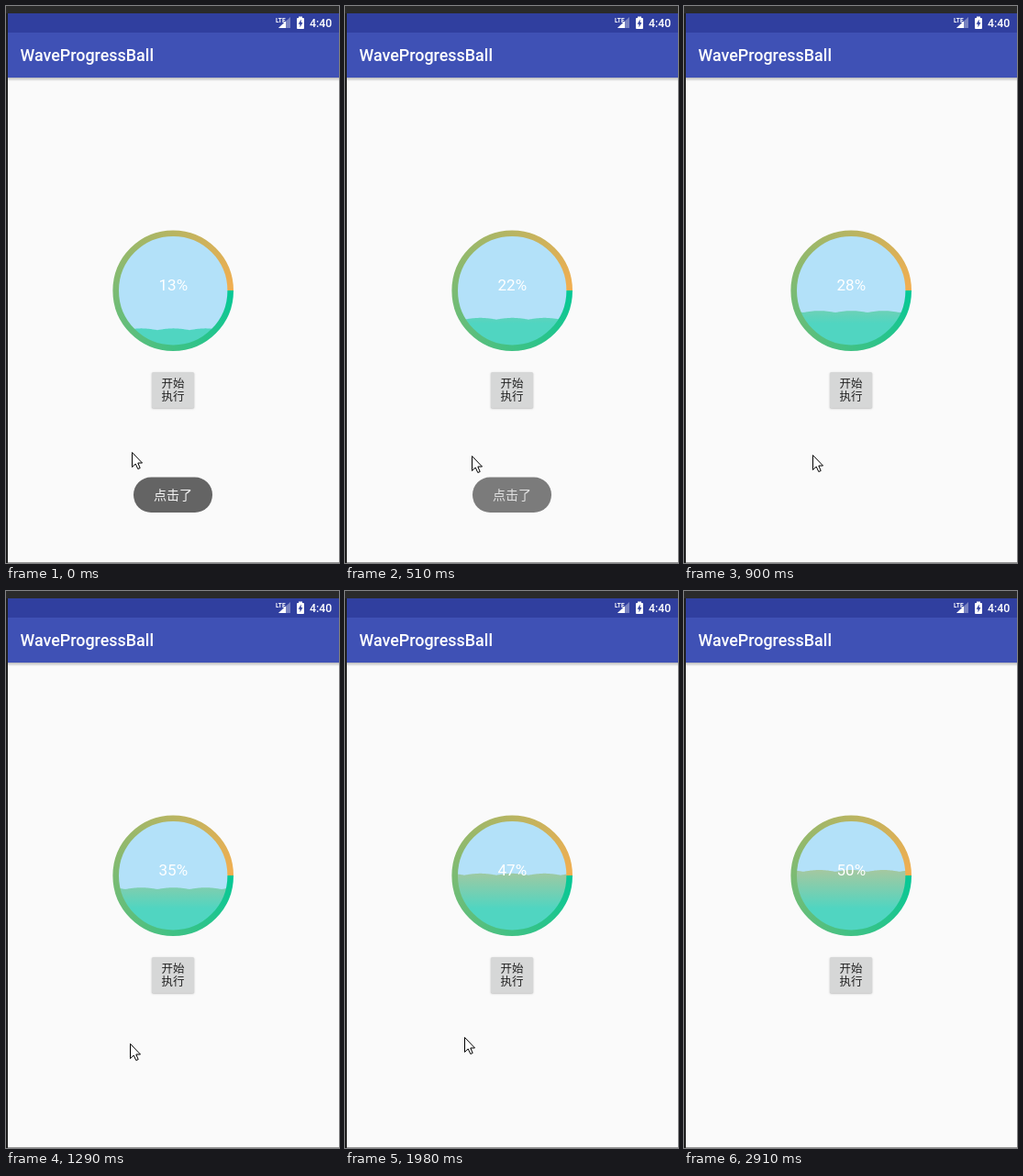
An HTML page with a canvas that plays this animation: 363 px wide and 607 px high, repeating every 3190 ms.

```html
<!DOCTYPE html>
<html lang="zh">
<head>
<meta charset="utf-8">
<title>WaveProgressBall</title>
<style>
html, body { margin: 0; width: 363px; height: 607px; overflow: hidden; background: #fafafa; }
canvas { display: block; }
</style>
</head>
<body>
<canvas id="stage" width="363" height="607"></canvas>
<script>
const ctx = document.getElementById('stage').getContext('2d');
const LOOP = 3190;
const CX = 182.2, CY = 310.2;
const CJK = '"Noto Sans CJK SC", "Noto Sans CJK", sans-serif';
// Resting places of the pointer tip
const STOPS = [
  { t: 0, x: 137, y: 486 },
  { t: 240, x: 137, y: 491 },
  { t: 630, x: 140, y: 489 },
  { t: 1290, x: 135, y: 493 },
  { t: 1680, x: 129, y: 490 },
  { t: 2250, x: 134, y: 460 },
  { t: 2490, x: 144, y: 436 },
  { t: 2790, x: 307, y: 600 },
];

const clamp = v => Math.min(1, Math.max(0, v));
const mix = (a, b, u) => a + (b - a) * u;
const easeIn = u => u ** 3;
const easeOut = u => 1 - (1 - u) ** 2;

function rect(color, x, y, w, h, r = 0) {
  ctx.fillStyle = color;
  ctx.beginPath();
  ctx.roundRect(x, y, w, h, r);
  ctx.fill();
}

function polygon(color, points) {
  ctx.fillStyle = color;
  ctx.beginPath();
  points.forEach(([x, y]) => ctx.lineTo(x, y));
  ctx.closePath();
  ctx.fill();
}

function disc(radius) {
  ctx.beginPath();
  ctx.arc(CX, CY, radius, 0, Math.PI * 2);
}

function blend(gradient, from, to) {
  gradient.addColorStop(0, from);
  gradient.addColorStop(1, to);
  return gradient;
}

function text(str, x, y, font, color = '#fff', align = 'left') {
  ctx.font = font;
  ctx.fillStyle = color;
  ctx.textAlign = align;
  ctx.fillText(str, x, y);
}

function drawScreen() {
  rect('#fafafa', 0, 0, 363, 607);
  rect(blend(ctx.createLinearGradient(0, 78, 0, 82), 'rgba(0,0,0,.26)', 'rgba(0,0,0,0)'), 0, 78, 363, 4);
  rect('#303f9f', 0, 8, 363, 21);
  rect('#3f51b5', 0, 29, 363, 49);
  rect('#2a2a2a', 0, 0, 363, 8);
  rect('#1e1e1e', 0, 8, 2, 599);
  rect('#999', 2, 606, 361, 1);
  text('WaveProgressBall', 15.5, 60, '500 17.9px Roboto, sans-serif');
}

function drawStatus() {
  polygon('rgba(255,255,255,.35)', [[310, 12], [310, 24], [297, 24]]);
  polygon('#fff', [[305, 16.6], [305, 24], [297, 24]]);
  rect('#303f9f', 293, 11, 10, 7);
  text('LTE', 294, 17.5, '700 6.5px Roboto, sans-serif');
  rect('#fff', 319, 11.5, 4, 2);
  rect('#fff', 317, 13, 8, 12, 1);
  polygon('#303f9f', [[321.7, 14.5], [318.7, 19.7], [320.5, 19.7], [320.5, 23.3], [323.4, 18], [321.7, 18]]);
  text('4:40', 331, 23, '500 12.4px Roboto, sans-serif');
}

function drawButton() {
  ctx.save();
  ctx.shadowColor = 'rgba(0,0,0,.28)';
  ctx.shadowBlur = 2;
  ctx.shadowOffsetY = 0.7;
  rect('#d6d7d7', 159, 399, 46, 39, 1.5);
  ctx.restore();
  ['开始', '执行'].forEach((line, i) =>
    text(line, 182, 415.5 + i * 14.5, '12.5px ' + CJK, '#212121', 'center'));
}

function drawWave(percent) {
  const level = 369.8 - 1.28 * percent;
  ctx.beginPath();
  ctx.moveTo(116, 380);
  for (let x = 116; x <= 248; x++) {
    ctx.lineTo(x, level - 1.8 * Math.abs(Math.sin(Math.PI * (x - 165) / 35)));
  }
  ctx.lineTo(248, 380);
  ctx.fillStyle = blend(ctx.createLinearGradient(0, 304, 0, 346), '#a5c8a0', '#50d5c1');
  ctx.fill();
}

function drawBall(percent) {
  ctx.save();
  disc(60);
  ctx.fillStyle = '#b3e1f9';
  ctx.fill();
  ctx.clip();
  drawWave(percent);
  ctx.restore();

  ctx.strokeStyle = blend(ctx.createConicGradient(0, CX, CY), '#05c896', '#f3ae50');
  ctx.lineWidth = 6.6;
  disc(62.5);
  ctx.stroke();
  text(percent + '%', 182.3, 310, '17px Roboto, sans-serif', '#fff', 'center');
}

function drawToast(alpha) {
  ctx.save();
  ctx.globalAlpha = alpha;
  rect('#646464', 139, 513.5, 86, 38.5, 19.2);
  text('点击了', 182, 538, '14px ' + CJK, '#f4f4f4', 'center');
  ctx.restore();
}

function drawPointer(t) {
  const next = STOPS.findIndex(stop => stop.t > t);
  if (next < 0) return;
  const a = STOPS[next - 1], b = STOPS[next];
  const ease = next === STOPS.length - 1 ? easeOut : easeIn;
  const u = ease((t - a.t) / (b.t - a.t));
  ctx.save();
  ctx.translate(Math.round(mix(a.x, b.x, u)) + 0.5, Math.round(mix(a.y, b.y, u)) + 0.5);
  polygon('#fff', [[0, 0], [0, 16], [3.7, 12.5], [6.3, 18], [8.7, 17], [6.3, 11.5], [11, 11.5]]);
  ctx.strokeStyle = '#000';
  ctx.lineWidth = 1;
  ctx.stroke();
  ctx.restore();
}

function draw(t) {
  drawScreen();
  drawStatus();
  drawBall(Math.min(50, Math.floor(13.2 + t * 0.01725)));
  drawButton();
  drawToast(1 - clamp((t - 390) / 360) ** 1.7);
  drawPointer(t);
}

const start = performance.now();
function loop() {
  draw((performance.now() - start) % LOOP);
  requestAnimationFrame(loop);
}
loop();
</script>
</body>
</html>
```
